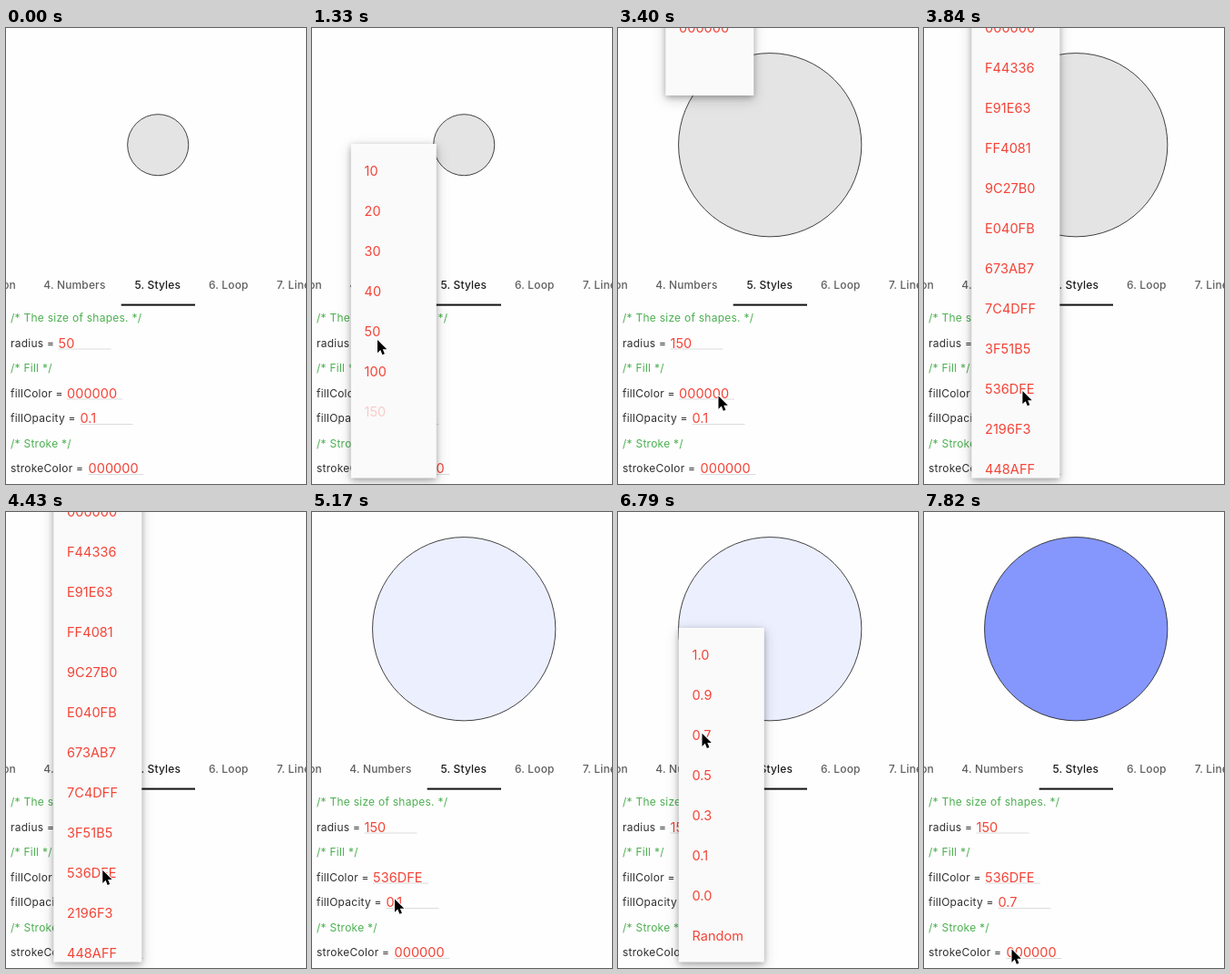
An HTML page for the animation above (8 s loop, 330 by 500 pixels).

```html
<!DOCTYPE html>
<html lang="en">
<head>
<meta charset="utf-8">
<title>Shape styles</title>
<style>
  html, body { margin: 0; width: 100%; height: 100%; overflow: hidden; background: #fefefe; }
  svg { display: block; width: 330px; height: 500px; font-family: Inter, Roboto, sans-serif; }
  .tab { font-size: 12px; font-weight: 500; letter-spacing: .15px; fill: #5f5f5f; }
  .tab.on { fill: #1c1c1c; }
  .code { font-size: 12px; letter-spacing: .25px; fill: #2f2f2f; }
  .note { fill: #4caf50; }
  .value { font-size: 14.5px; letter-spacing: .05px; fill: #f44336; }
  .line { stroke: #dcdcdc; stroke-width: 1; }
  .panel { fill: #fafafa; filter: drop-shadow(0 2px 3px rgba(0,0,0,.25)) drop-shadow(0 4px 7px rgba(0,0,0,.18)); }
</style>
</head>
<body>
<svg id="stage" viewBox="0 0 330 500"></svg>
<script>
const NS = 'http://www.w3.org/2000/svg';
const stage = document.getElementById('stage');
const LOOP = 8000;
const STEP = 147.3; // the picture advances once per step

function add(parent, tag, attrs, text) {
  const el = document.createElementNS(NS, tag);
  for (const name in attrs) el.setAttribute(name, attrs[name]);
  if (text !== undefined) el.textContent = text;
  parent.appendChild(el);
  return el;
}

function label(parent, x, y, cls, text, anchor = 'start') {
  return add(parent, 'text', { x, y, class: cls, 'text-anchor': anchor }, text);
}

const show = (el, on) => { el.style.display = on ? '' : 'none'; };
const clamp = v => Math.max(0, Math.min(1, v));

// preview and tabs
const circle = add(stage, 'circle', { cx: 167.2, cy: 128.2, stroke: '#222', 'stroke-width': .85 });

label(stage, 11, 285.5, 'tab', '3. Animation', 'end');
label(stage, 41.3, 285.5, 'tab', '4. Numbers');
label(stage, 141.5, 285.5, 'tab on', '5. Styles');
label(stage, 223, 285.5, 'tab', '6. Loop');
label(stage, 297.8, 285.5, 'tab', '7. Lines');
add(stage, 'rect', { x: 126.7, y: 302.6, width: 81.3, height: 2, fill: '#111' });

// code rows
const rowY = i => 322.3 + 27.5 * i;
const note = (i, text) => label(stage, 5, rowY(i), 'code note', text);

function field(row, name, x, width) {
  const y = rowY(row);
  label(stage, 5, y, 'code', name + ' =');
  add(stage, 'line', { x1: x, x2: x + width, y1: y + 2.2, y2: y + 2.2, class: 'line' });
  return { x, width, y, text: label(stage, x, y + .8, 'value', '000000') };
}

note(0, '/* The size of shapes. */');
const radius = field(1, 'radius', 57.5, 58);
note(2, '/* Fill */');
const fill = field(3, 'fillColor', 67, 61);
const opacity = field(4, 'fillOpacity', 81.5, 58);
note(5, '/* Stroke */');
const stroke = field(6, 'strokeColor', 90.5, 61);

// drop-down lists
const BOTTOM = 493.5;

function makeMenu(owner, top, opens, closes, words) {
  const x = owner.x - 14.7;
  const g = add(stage, 'g', {});
  const panel = add(g, 'rect', { x, y: top, width: owner.width + 36, class: 'panel' });
  const itemY = i => top + 34.5 + 44 * i;
  const items = words.split(' ').map((w, i) => label(g, owner.x, itemY(i), 'value', w));
  // off-screen parts leave a taller list no extra time to reveal its items
  const rate = top < 0 ? 11 : 5.25;

  function draw(k) {
    const age = k - opens;
    show(g, age >= 0 && k < closes);
    panel.setAttribute('height', age > 0 ? BOTTOM - top : 104);
    items.forEach((el, i) => el.setAttribute('opacity', clamp(1 + rate * age - i)));
  }
  return { draw, itemY, closes };
}

const radiusMenu = makeMenu(radius, 127, 8, 16, '10 20 30 40 50 100 150 Random');
const fillMenu = makeMenu(fill, -30, 23, 31,
  '000000 F44336 E91E63 FF4081 9C27B0 E040FB 673AB7 7C4DFF 3F51B5 536DFE 2196F3 448AFF');
const opacityMenu = makeMenu(opacity, 127, 37, 48, '1.0 0.9 0.7 0.5 0.3 0.1 0.0 Random');

// pointer
const cursor = add(stage, 'path', {
  d: 'M1 1.2V15.4L4.3 12.3 6.4 17.4 8.9 16.4 6.8 11.4H11.3Z',
  fill: '#000', stroke: '#fff', 'stroke-width': 1.8, 'paint-order': 'stroke', 'stroke-linejoin': 'round'
});

// the tip points a little above the baseline of what it clicks
const move = (from, to, dx, owner, y, bend = 0) => ({ from, to, x: owner.x + dx, y: y - 9, bend });

const moves = [
  move(1, 6, 13.5, radius, radius.y),
  move(10, 15, 12, radius, radiusMenu.itemY(6) - 2),
  move(18, 21, 42.5, fill, fill.y + 6.5),
  move(25, 27, 38.3, fill, fillMenu.itemY(9)),
  move(30, 35, 8.5, opacity, opacity.y),
  move(40, 46, 10, opacity, opacityMenu.itemY(2) + 1),
  move(47, 53, 5, stroke, stroke.y, 30)
];

const ease = p => (p + p * p * (3 - 2 * p)) / 2;

function cursorAt(k) {
  let x = 126, y = 447;
  for (const m of moves) {
    const p = clamp((k - m.from) / (m.to - m.from));
    x += (m.x - x) * ease(p) + m.bend * Math.sin(Math.PI * p);
    y += (m.y - y) * ease(p);
  }
  return [x, y];
}

function draw(t) {
  const k = Math.floor(t / STEP + .05);
  const size = k < radiusMenu.closes ? '50' : '150';
  const color = k < fillMenu.closes ? '000000' : '536DFE';
  const alpha = k < opacityMenu.closes ? '0.1' : '0.7';

  radius.text.textContent = size;
  fill.text.textContent = color;
  opacity.text.textContent = alpha;

  circle.setAttribute('r', size * .671);
  circle.setAttribute('fill', '#' + color);
  circle.setAttribute('fill-opacity', alpha);
  show(circle, k !== fillMenu.closes - 1); // cleared just before the new colour

  for (const menu of [radiusMenu, fillMenu, opacityMenu]) menu.draw(k);

  show(cursor, k >= 1);
  cursor.setAttribute('transform', `translate(${cursorAt(k)})`);
}

const start = performance.now();
function tick() {
  draw((performance.now() - start) % LOOP);
  requestAnimationFrame(tick);
}
draw(0);
requestAnimationFrame(tick);
</script>
</body>
</html>
```
